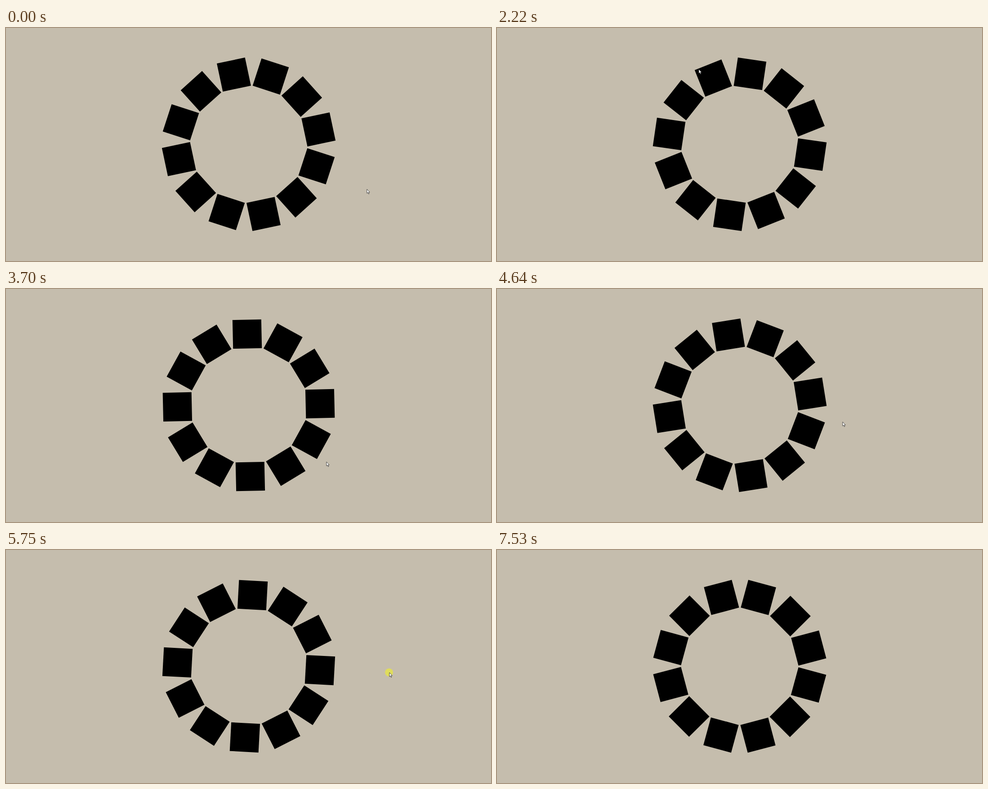
Write an HTML page that moves like this. It is 1079 px wide and 519 px high and loops after 7.65 s.

```html
<!DOCTYPE html>
<html lang="en">
<head>
<meta charset="utf-8">
<title>Ring of squares</title>
<style>
  html, body { margin: 0; width: 100%; height: 100%; overflow: hidden; background: #c5bdad; }
  svg { display: block; }
</style>
</head>
<body>
<svg width="1079" height="519" viewBox="0 0 1079 519">
  <g id="ring"></g>
  <circle id="press" r="9" fill="#dfdc5c"/>
  <path id="pointer" d="M0 0V9.2L2.1 7.3L3.6 10.7L5 10.1L3.6 6.8H6.2Z"
        fill="#fff" stroke="#222" stroke-width=".8"/>
</svg>
<script>
const LOOP = 7650;
const SPIN_START = 620;
const STEP = 78.5; // the picture advances in even steps, step 0 being the first turn
const CENTER = { x: 540, y: 259 };
const RADIUS = 158.7;
const SIZE = 64;
const SPIN_PER_PIXEL = 0.0087; // degrees per step for each pixel right of centre
const PRESS_STEP = 65;

// Turning points of the pointer: [step, x, y]
const PATH = [
  [-8, 803, 359], [-1, 786, 189], [4, 760, 330], [8, 538.5, 366.5], [14, 274, 215],
  [20, 449, 92], [34, 814, 250], [39, 713, 385], [49, 817, 462], [51, 769, 296],
  [59, 957, 452], [PRESS_STEP, 853, 273], [79, 975, 489]
];

// Ring angle between changes of pace: [step, degrees]
const SPIN = [[-1, -12], [8, 1.9], [20, -21.7], [39, -1.25], [51, 20.9], [65, 63.1], [88, 135.2]];

// Smooth curve through keys, with the slope at each key given by a function.
function hermite(keys, step, axis, slope) {
  if (step <= keys[0][0]) return keys[0][axis];
  const end = keys.findIndex(key => key[0] > step);
  if (end < 0) return keys.at(-1)[axis];
  const a = keys[end - 1], b = keys[end];
  const span = b[0] - a[0], u = (step - a[0]) / span, v = 1 - u;
  return a[axis] * v * v * (1 + 2 * u) + b[axis] * u * u * (3 - 2 * u)
    + span * u * v * (v * slope(end - 1) - u * slope(end));
}

function pointerAt(step, axis) {
  return hermite(PATH, step, axis, i => {
    const a = PATH[Math.max(0, i - 1)], b = PATH[Math.min(PATH.length - 1, i + 1)];
    return (b[axis] - a[axis]) / (b[0] - a[0]);
  });
}

// The ring turns faster the further the pointer is from the centre line.
const angleAt = step =>
  hermite(SPIN, step, 1, i => SPIN_PER_PIXEL * (pointerAt(SPIN[i][0], 1) - CENTER.x));

const [ring, press, pointer] = ['ring', 'press', 'pointer'].map(id => document.getElementById(id));

for (let i = 0; i < 12; i++) {
  const square = document.createElementNS('http://www.w3.org/2000/svg', 'rect');
  square.setAttribute('x', -SIZE / 2);
  square.setAttribute('y', -RADIUS - SIZE / 2);
  square.setAttribute('width', SIZE);
  square.setAttribute('height', SIZE);
  square.setAttribute('transform', `rotate(${i * 30})`);
  ring.append(square);
}

const show = (element, visible) => element.setAttribute('visibility', visible ? 'visible' : 'hidden');
const move = (element, x, y, angle = 0) =>
  element.setAttribute('transform', `translate(${x} ${y}) rotate(${angle})`);

function draw(step) {
  const x = pointerAt(step, 1), y = pointerAt(step, 2);
  move(ring, CENTER.x, CENTER.y, angleAt(step));
  move(pointer, x, y);
  move(press, x - 0.8, y - 0.3);
  show(pointer, step < 80);
  show(press, Math.abs(step - PRESS_STEP) <= 1);
}

const start = performance.now();
function tick() {
  const time = (performance.now() - start) % LOOP;
  draw(Math.floor((time - SPIN_START) / STEP));
  requestAnimationFrame(tick);
}
tick();
</script>
</body>
</html>
```
